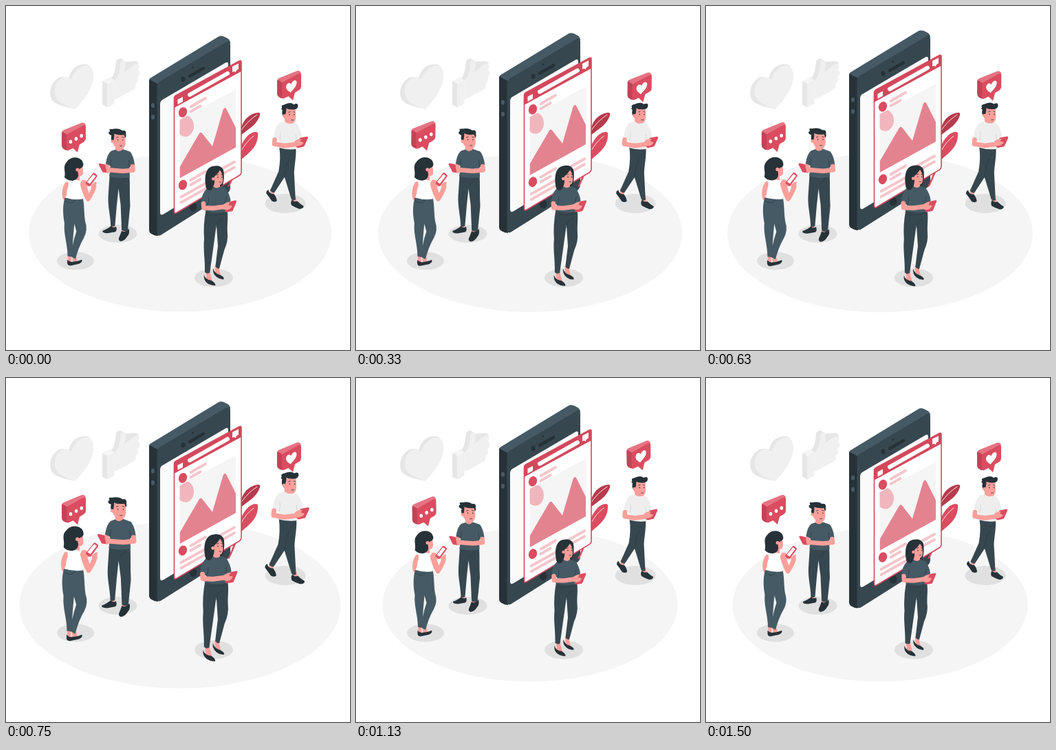
Write an HTML page that moves like this. It is 500x500 px and loops after 1.54 s.

```html
<!DOCTYPE html>
<html lang="en">
<head>
<meta charset="utf-8">
<title>Social feed</title>
<style>
  html, body { margin: 0; width: 100%; height: 100%; overflow: hidden; background: #fff; }
  svg { display: block; width: 100vw; height: 100vh; }
  .red { fill: #db4c60; }
  .deep { fill: #b63b4d; }
  .dark { fill: #37474f; }
  .slate { fill: #455a64; }
  .ink { fill: #263238; }
  .skin { fill: #fa9f9a; }
  .white { fill: #fff; }
  .shade { fill: #e0e0e0; }
  .pale { fill: #f0f0f0; }
  .line { fill: none; stroke-linecap: round; stroke-linejoin: round; }
  .arm { stroke: #fa9f9a; stroke-width: 6.5; }
  .bar { stroke: #f4c6cb; stroke-width: 4; }
  .crease { stroke: #2b3a42; stroke-width: .7; }
  .face { stroke: #263238; stroke-width: .8; }
  .eye { stroke: #263238; stroke-width: 1.5; }
  .rib { stroke: #fbe4e6; stroke-width: 1; }
</style>
</head>
<body>
<svg viewBox="0 0 500 500" xmlns="http://www.w3.org/2000/svg">
  <defs>
    <clipPath id="photo"><path d="M252.500 166L334 122V206L252.500 251Z"/></clipPath>
    <g id="bubble">
      <path fill="#e57483" d="M81 185Q81 182 84 180.500L110 170Q113 169 115 171.500L116 174 89 188Z"/>
      <path fill="#c24356" d="M81 184Q82 183 84 184L89 187.500V210Q86 210 83 207.500Q81 206 81 203Z"/>
      <path class="red" d="M88 190Q88 187 91 185.500L112 174Q116 172 116 176V193Q116 196 113 198L107 201.500 104 213 97.500 207 91 210Q88 211 88 207Z"/>
    </g>
  </defs>

  <ellipse id="floor" cx="253" cy="330" rx="214.500" ry="111.500" fill="#f5f5f5"/>
  <g class="shade">
    <ellipse cx="101" cy="370.500" rx="27" ry="13"/>
    <ellipse cx="162.500" cy="331" rx="28" ry="13"/>
    <ellipse cx="302" cy="395" rx="28" ry="13.500"/>
    <ellipse cx="406" cy="287" rx="29.500" ry="14"/>
  </g>

  <!-- pale heart and thumb -->
  <path fill="#e6e6e6" d="M100.500 150C88 147 74 144 68 138C62 131 63 117 71 109C77 102 84 102 91 105C93 98 97 91 102 88C109 84 117 83 122 87L105 130Z"/>
  <path class="pale" d="M100.500 150C112 138 128 120 127 99C126 86 117 83 107 90C100 95 97 101 95 107C90 102 84 102 78 107C70 114 68 127 74 135C79 142 90 146 100.500 150Z"/>
  <path fill="#f5f5f5" d="M140 109L152 103 157.500 107 146 113Z"/>
  <path fill="#e6e6e6" d="M140 109L147.500 113V147.500L140 143.500Z"/>
  <path class="pale" d="M147.500 113L157.500 107V142L147.500 147.500Z"/>
  <path fill="#e6e6e6" d="M153 105C159 98 159 88 160 80Q162 76 167 76.500L174 81 187 80Q192 80 193 84L160 110Z"/>
  <path class="pale" d="M157.500 109C164 102 166 93 166 84C167 77 175 78 174 86L172 96 187 84.500C193 81 196 88 191.500 93C196 94 195 101 191 103C193 106 192 111 188 113C190 117 188 120 184 122C174 128 167 132 157.500 136Z"/>

  <g id="phone">
    <path class="slate" d="M208 109Q208 106 211 104.500L308 45.500Q312 43 317 45L322 47.500Q326 50 326 54L220 117Z"/>
    <path class="ink" d="M208 107L221 114V334.500Q217 335 212 332Q208 330 208 326Z"/>
    <path class="dark" d="M219.500 117Q219.500 112.500 223 110.500L320 53Q326 49.500 326 57V264Q326 270 321 273L225 333.500Q219.500 336 219.500 329Z"/>
    <path fill="#fafafa" d="M224 143Q224 139 227 137L319 83Q323 81 323 85V242Q323 246 320 248L229 303Q224 306 224 300Z"/>
    <g class="ink">
      <ellipse cx="257.500" cy="107" rx="3" ry="3.700"/>
      <circle cx="271.500" cy="89.500" r="1.500"/>
      <ellipse cx="272" cy="292.500" rx="5.500" ry="6.500"/>
    </g>
    <path class="line" stroke="#263238" stroke-width="4.500" d="M267 102.500L287 91"/>
    <g class="slate"><ellipse cx="213.500" cy="145" rx="2.600" ry="3.400"/><ellipse cx="213.500" cy="162" rx="2.600" ry="3.400"/></g>
  </g>

  <path class="deep" d="M341 188C340 171 351 156 367 155Q370 155 369 159C365 172 354 178 341 188Z"/>
  <path class="red" d="M322 263C331 245 334 231 337 216C342 200 350 184 363 183Q367 183 366 188C366 206 350 216 341 224C336 236 331 250 325 262Z"/>
  <path class="line rib" d="M341 182Q351 167 365 158M341 212Q349 197 360 189"/>

  <g id="post">
    <path class="white" d="M244.500 135Q244.500 132 247 130.500L339 80.500Q342 79 342 82V242Q342 245 339.500 246.500L248 301Q244.500 303 244.500 299Z"/>
    <path fill="#d3485c" d="M244.500 148.500V135Q244.500 132 247 130.500L339 80.500Q342 79 342 82V95.500Z"/>
    <path class="line" stroke="#d3485c" stroke-width="1.600" d="M244.500 135Q244.500 132 247 130.500L339 80.500Q342 79 342 82V242Q342 245 339.500 246.500L248 301Q244.500 303 244.500 299Z"/>
    <path class="white" d="M249.500 136.500L257 132.500V139.500L249.500 143.500Z"/>
    <path class="line" stroke="#fff" stroke-width="6" d="M267 129.500L322 98.500"/>
    <path class="white" d="M329 88.500L338 84V92L335 94 333.500 97 331.500 95.500 329 96.500Z"/>
    <path fill="#f5f5f5" d="M252.500 166L334 122V206L252.500 251Z"/>
    <g clip-path="url(#photo)">
      <ellipse cx="260.500" cy="175" rx="12.500" ry="15.500" fill="#f1b6bd"/>
      <path fill="#e48390" d="M252.500 234.500L280.500 186.500Q283 182.500 285.500 186L300 204.500 315.500 151.500Q318 146 320.500 150.500L334 177.500V206L252.500 251Z"/>
    </g>
    <g class="red"><ellipse cx="257" cy="155" rx="6" ry="7.500" transform="rotate(20 257 155)"/><ellipse cx="257" cy="260.500" rx="6" ry="7.500" transform="rotate(20 257 260.500)"/></g>
    <path class="line bar" d="M268.500 147L290 134.500M268.500 154L282.500 146M268.500 253.500L290 241M268.500 260.500L282.500 252.500M300 245L332 227M254.500 278L332 235M254.500 286L292 265"/>
  </g>

  <g id="texter">
    <path class="skin" d="M90 360H95V372H91ZM96 360L102 361 104 370 98 372Z"/>
    <path class="ink" d="M89.500 367Q93 371 97 370Q103 370 110 367Q112 370 106 373L94 375.500Q90 375.500 89.500 372Z"/>
    <path class="line arm" d="M89 260Q84 268 86 279"/>
    <path class="slate" d="M86 279H111.500C114 290 113 302 115 313Q119 325 113 336C107 346 104 356 101 366L95.500 363 90 362C90 345 84 331 85.500 315C83 302 83 290 86 279Z"/>
    <path fill="#f5f5f5" d="M99.500 316L102.500 327Q99 337 97 347Q98 331 99.500 316Z"/>
    <path class="line crease" d="M87 284Q97 290 101 282"/>
    <path class="skin" d="M98 243H107V257H98Z"/>
    <path fill="#fff" d="M91 256Q100 252 110 256Q113 267 111.500 281Q99 283 86.500 279Q92 270 91 256Z"/>
    <path class="skin" d="M101 232Q110 231 111.500 237L112 243Q112 248.500 107 249L101 248Z"/>
    <path class="ink" d="M89 228C95 220 107 221 111 227.500Q114 234 110 236.500Q105 238 104.500 243C106.500 249 104 254 97 255Q89 255 85.500 250C88 242 82 235 89 228Z"/>
    <circle class="skin" cx="104" cy="239.500" r="2.500"/>
    <path class="line arm" d="M111 260Q114 272 119 281Q125 272 127.500 264M119 279L112 258"/>
    <path class="skin" d="M110 254Q116 253 118 257L121 263 116 264Z"/>
    <path class="red" d="M115.500 258L126 244.500Q127 243.500 128.500 244.500L131.500 247Q132.500 248 131.500 249.500L122.500 262Q121.500 263.500 120 262.500L116 260Q115 259 115.500 258Z"/>
    <path class="white" d="M117.500 257L126.500 246 130 248.500 121.500 259.500Z"/>
    <path class="skin" d="M123 262Q128 256 131 257L130 265 125 268Z"/>
  </g>

  <g id="reader">
    <path class="skin" d="M152.500 314H158V323H152.500ZM168 320H175V329H168Z"/>
    <path class="ink" d="M153 318Q156 322 160 319Q162 324 159 326.500L148 328.500Q140 328 141 325Q149 322 153 318ZM168 325Q172 329 178 322Q180 329 176 333Q172 340 166 340Q162 338 165 333Z"/>
    <path class="dark" d="M151 245H179C180 260 179 274 180 290L176.500 325Q172 327 168 324L166.500 288 163.500 265 161 289 158.500 318Q155 320 152.500 318C152 302 148 290 149 275Z"/>
    <path class="line crease" d="M172 251Q171 257 165 259"/>
    <path class="line arm" d="M150.500 226Q146 234 146.500 239"/>
    <path class="skin" d="M159 202H170V214Q164 218 159 213Z"/>
    <path class="slate" d="M153 212L159 210Q164 215 170 209.500L180 213Q185 219 186.500 232L179 235 179.500 249Q165 252 150.500 248L152 233 145.500 230Q147 217 153 212Z"/>
    <path class="line crease" d="M152 233L153 224M179 235L178 225"/>
    <path class="skin" d="M155 189Q165 184 172.500 189L173.500 200Q173 209 166.500 209.500Q157 208 155 199Z"/>
    <path class="ink" d="M155 201Q152 195 153.500 190Q148 188 150 185L151.500 184Q149 180 154 181Q164 179 168.500 183Q175 182 174 188Q175 191 173 194L171.500 189Q163 190 157.500 187.500Q157.500 195 156 198Z"/>
    <circle class="skin" cx="155" cy="198.500" r="2.300"/>
    <path class="line face" d="M160.500 193L163 192.300M168.500 192.300L171 193M165.500 204.500Q167 205.300 168.500 204.500"/>
    <path class="line eye" d="M162.500 196.300V196.400M169.800 196.300V196.400"/>
    <path class="line arm" d="M183.500 234L184 239 170 240.500 152 239"/>
    <path class="red" d="M135.500 231.500Q135 229.500 137 229.500L144 231 149.500 240Q151 243 148 243L141 242Z"/>
    <path class="skin" d="M145 234Q150 233 154 237L153 242 147 243Z"/>
  </g>

  <g id="woman">
    <path class="skin" d="M291 384H296.500L300 398 292 396ZM303.500 376L309 378 312 390 304.500 386Z"/>
    <path class="ink" d="M288.500 389Q290 396 299 397Q305 401 304.500 404Q299 405 293 401Q287 396 288.500 389ZM301.500 380Q303 387 311 389Q317 392 316.500 395Q311 396 306 392Q300 387 301.500 380Z"/>
    <path class="dark" d="M291 297H321C323 308 321 316 321.500 328Q323 341 317 354L310 380Q307 381 304.500 377L308 348 306 318 302 347 296.500 386Q292 388 289.500 385C290 367 287 354 288.500 338Q287 318 291 297Z"/>
    <path class="line crease" d="M306 322Q306 313 314 310M292 303Q305 306 320 302"/>
    <path class="ink" d="M300 240Q310 233 315.500 240Q318 248 315 262L305 268Z"/>
    <path class="skin" d="M302 254H311V267Q306 270 302 265Z"/>
    <path class="slate" d="M293 266L301 263.500Q306 268 311 264L319 266Q325 275 326 284L321 289 321.500 299Q305 303 290 298L293 290 284 287Q285 273 293 266Z"/>
    <path class="line crease" d="M293 290Q296 285 295 279M318 286L320 278"/>
    <path class="skin" d="M301 243Q308 238 314 242L315 254Q315 261.500 309.500 262Q303 261 301 255Z"/>
    <path class="ink" d="M290.500 261C289 249 291 237 301 235Q312 232.500 315.500 240Q317 245 315.500 250Q314 245 311 240.500Q307 247 303 249.500C304 257 303 264 298 269Q291 271 290.500 261Z"/>
    <circle class="skin" cx="301.500" cy="253" r="2.300"/>
    <path class="line face" d="M306.500 247.500L309 246.700M312.500 246.700L314.300 247.500M310 257.500Q311.300 258.300 312.500 257.500"/>
    <path class="line eye" d="M308 250.600V250.700M313.500 250.600V250.700"/>
    <path class="line arm" d="M287.500 288L288 294 302 294.500 320 292"/>
    <path class="red" d="M318 297L323 285.500 333 283.500Q335 284 334 286L329.500 297Q329 299 327 299L320 300Q317 300 318 297Z"/>
    <path class="skin" d="M315 290Q321 285 325 286L323 290 328 291Q327 296 321 297L315 296Z"/>
  </g>

  <g id="walker">
    <path class="skin" d="M385 264L391 267 389 275 384 272ZM415 276H421L423 286 416 284Z"/>
    <path class="ink" d="M382 266Q383 272 390 272Q394 277 394 282Q391 284 387 282Q383 276 379 271Q379 267 382 266ZM415.500 280Q419 284 423 282Q428 287 432 289Q432 293 426 293Q420 291 415 288Q413 284 415.500 280Z"/>
    <path class="dark" d="M397.500 205H421C422 218 419 230 418.500 242L420.500 280Q417 282 414.500 279L405 248 390.500 270Q387 270 384.500 267L396.500 240Q400 222 397.500 205Z"/>
    <path class="line crease" d="M405 248Q406 232 412 222M413 217Q418 215 419 211"/>
    <path class="skin" d="M405 163H416V173Q411 178 405 173Z"/>
    <path fill="#eeeeee" d="M398 171L405 169Q411 175 416.500 170L423 173Q429 182 430 193L422 198 422.500 208Q409 210 396.500 206L398 196 389 194Q391 177 398 171Z"/>
    <path class="line" stroke="#d2d2d2" stroke-width=".8" d="M398 196Q400 190 399 184M422 198L421 188"/>
    <path class="skin" d="M404 151Q413 147 420.500 152L421 163Q420.500 172 414.500 172Q406 170 404 163Z"/>
    <path class="ink" d="M404.500 164Q400 159 402 153Q399 151 401.500 150Q399 146 405 145Q414 141 418 145Q424 142 424 147Q424 151 419.500 152Q411 153 407.500 150.500Q407.500 158 405 161Z"/>
    <circle class="skin" cx="404.500" cy="161" r="2.300"/>
    <path class="line face" d="M410.500 156L413 155.300M417.500 155.300L419.500 156M414.500 167Q416 167.800 417.500 167"/>
    <path class="line eye" d="M412 159.300V159.400M418.700 159.300V159.400"/>
    <path class="line arm" d="M391 195L390.500 201 405 203.500 424 201"/>
    <path class="red" d="M421.500 203L426.500 192.500 436.500 190.500Q439 191 438 193L433.500 203Q433 205 431 205L424 206.500Q421 206 421.500 203Z"/>
    <path class="skin" d="M419 197Q425 193 429 194L427 197 432 199Q430 203 424 204L419 204Z"/>
  </g>

  <g id="bubbles">
    <use href="#bubble"/>
    <g class="white"><ellipse cx="94" cy="197.500" rx="2.300" ry="2.700"/><ellipse cx="102" cy="193.200" rx="2.300" ry="2.700"/><ellipse cx="109.800" cy="189" rx="2.300" ry="2.700"/></g>
    <use href="#bubble" x="313" y="-76"/>
    <path class="white" d="M413.500 125.500C410 123 407 121.500 407 117C407.500 112 412 110 414.500 113.500C416 107.500 422 105.500 422.500 110.500C422.500 117 417 121 413.500 125.500Z"/>
  </g>
</svg>
<script>
  const LOOP = 1540, LEAD = 38;
  const $ = id => document.getElementById(id);

  // Piecewise linear track: [position, value] pairs over one loop.
  function track(keys, p) {
    const i = keys.findIndex(k => k[0] > p);
    const [a, u] = keys[i - 1], [b, v] = keys[i];
    return u + (v - u) * (p - a) / (b - a);
  }

  const beat = [[0, 1], [.1, 1.1], [.3, 1], [.4, 1], [.5, 1.1], [.6, 1], [1, 1]];
  const lift = [[0, 0], [.5, -10], [1, 0]];
  const sway = [[0, 0], [.25, 1], [.75, -1], [1, 0]];

  const beating = [
    ['floor', 253, 330], ['texter', 107, 299], ['reader', 162, 260],
    ['woman', 309, 319], ['walker', 408.5, 218]
  ].map(([id, x, y]) => [$(id), x, y]);
  const floating = [$('phone'), $('post')];
  const bubbles = $('bubbles');

  function draw(ms) {
    const p = ((ms + LEAD) % LOOP) / LOOP;
    const s = track(beat, p);
    for (const [el, x, y] of beating)
      el.setAttribute('transform', `translate(${x * (1 - s)} ${y * (1 - s)}) scale(${s})`);
    for (const el of floating)
      el.setAttribute('transform', `translate(0 ${track(lift, p)})`);
    bubbles.setAttribute('transform', `rotate(${track(sway, p)} 255 154)`);
  }

  const start = performance.now();
  function tick() {
    draw(performance.now() - start);
    requestAnimationFrame(tick);
  }
  draw(0);
  requestAnimationFrame(tick);
</script>
</body>
</html>
```
